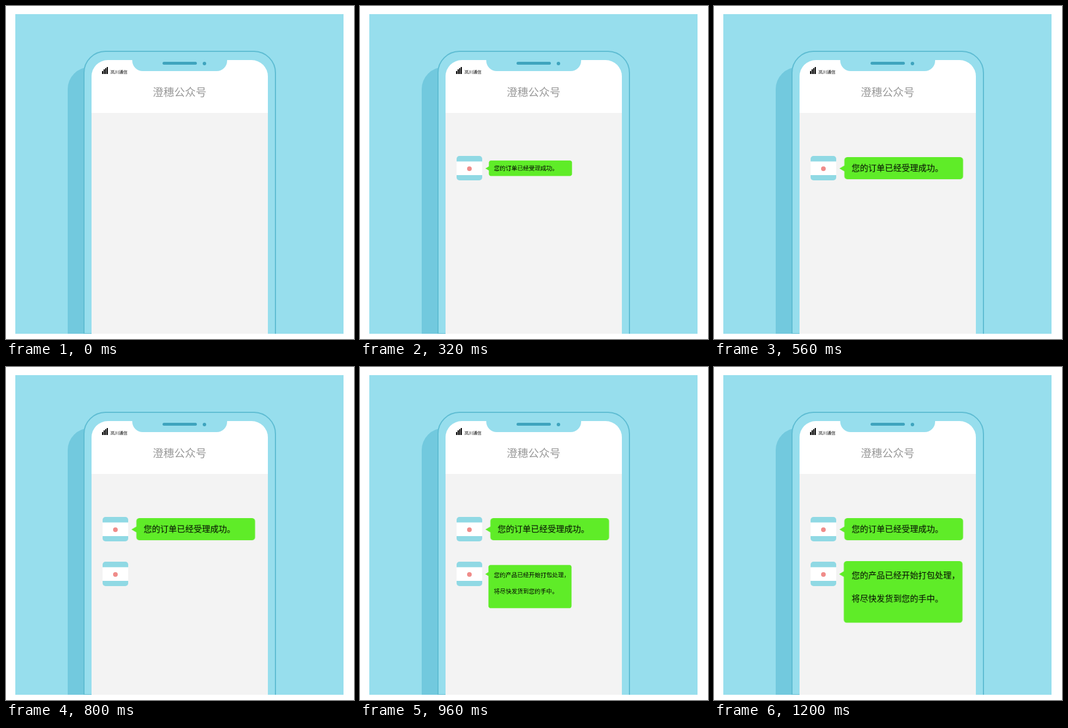
Animation, 598 px wide and 573 px high, one loop 1.44 s. Source, as an HTML page:

```html
<!DOCTYPE html>
<html lang="zh-CN">
<head>
<meta charset="utf-8">
<title>订单通知</title>
<style>
  html, body { margin: 0; width: 100%; height: 100%; overflow: hidden; background: #fff; }
  svg { display: block; width: 598px; height: 573px; }
  text { font-family: "Noto Sans CJK SC", "Noto Sans CJK", "Noto Sans", sans-serif; }
  .carrier { font-size: 7.3px; font-weight: 500; }
  .title { font-size: 18.5px; fill: #999; }
  .bubble { fill: #5fec28; }
  .bubble text { font-size: 14.3px; font-weight: 500; fill: #000; }

  .avatar, .bubble { animation: 1440ms step-end infinite; }
  .first.avatar { animation-name: show-first; }
  .second.avatar { animation-name: show-second; }
  .first.bubble { animation-name: pop-first; transform-origin: 215.5px 279.5px; }
  .second.bubble { animation-name: pop-second; transform-origin: 215.5px 356.3px; }

  /* Each picture holds for 80 ms = 5.5556% of the loop. */
  @keyframes show-first { 0% { opacity: 0; } 11.11%, 100% { opacity: 1; } }
  @keyframes show-second { 0% { opacity: 0; } 55.55%, 100% { opacity: 1; } }
  @keyframes pop-first {
    0% { transform: scale(0); }
    16.66% { transform: scale(.35); }
    22.22% { transform: scale(.7); }
    27.77% { transform: scale(1.05); }
    33.33% { transform: scale(1.025); }
    38.88%, 100% { transform: scale(1); }
  }
  @keyframes pop-second {
    0% { transform: scale(0); }
    61.11% { transform: scale(.35); }
    66.66% { transform: scale(.7); }
    72.22% { transform: scale(1.05); }
    77.77% { transform: scale(1.025); }
    83.33%, 100% { transform: scale(1); }
  }
</style>
</head>
<body>
<svg viewBox="0 0 598 573">
  <defs>
    <clipPath id="card"><rect x="16" y="14" width="564" height="550"/></clipPath>
    <g id="tile">
      <rect x="166" y="258" width="44" height="42" rx="5" fill="#90d9e4"/>
      <rect x="166" y="267.5" width="44" height="23.5" fill="#fff"/>
      <circle cx="188" cy="280" r="4" fill="#f08c8a"/>
    </g>
  </defs>

  <g clip-path="url(#card)">
    <rect x="16" y="14" width="564" height="550" fill="#97deed"/>

    <!-- phone -->
    <rect x="106" y="105" width="329" height="600" rx="38" fill="#72c9de"/>
    <rect x="134" y="78" width="329" height="600" rx="37" fill="#97deed" stroke="#5fbdd3" stroke-width="2"/>
    <rect x="133" y="563" width="15" height="1" fill="#5fbdd3"/>
    <path d="M147 564V121a28 28 0 0 1 28-28H422a28 28 0 0 1 28 28V564Z" fill="#fff"/>
    <rect x="147" y="184" width="303" height="380" fill="#f3f3f3"/>
    <path d="M217 92V94a18 18 0 0 0 18 18H362a18 18 0 0 0 18-18V92Z" fill="#97deed"/>
    <rect x="269" y="96" width="59" height="5" rx="2.5" fill="#3fa4be"/>
    <circle cx="341" cy="99" r="3" fill="#3fa4be"/>

    <!-- status bar -->
    <path d="M165 117v-5h2v5ZM167.7 117v-8h2v8ZM170.3 117v-10h2v10ZM173 117v-12h2v12Z"/>
    <text class="carrier" x="179.6" y="116">岚川通信</text>
    <text class="title" x="252" y="155">澄穗公众号</text>

    <!-- messages -->
    <g class="first avatar"><use href="#tile"/></g>
    <g class="first bubble">
      <path d="M215.5 279.5L225 274V285Z"/>
      <rect x="224" y="260" width="204" height="38" rx="5"/>
      <text x="236.5" y="284">您的订单已经受理成功。</text>
    </g>

    <g class="second avatar"><use href="#tile" y="77"/></g>
    <g class="second bubble">
      <path d="M215 356.3L224 351V361.6Z"/>
      <rect x="223" y="334" width="204" height="106" rx="5"/>
      <text x="236.5" y="363.7">您的产品已经开始打包处理，</text>
      <text x="236.5" y="403.7">将尽快发货到您的手中。</text>
    </g>
  </g>
</svg>
</body>
</html>
```
